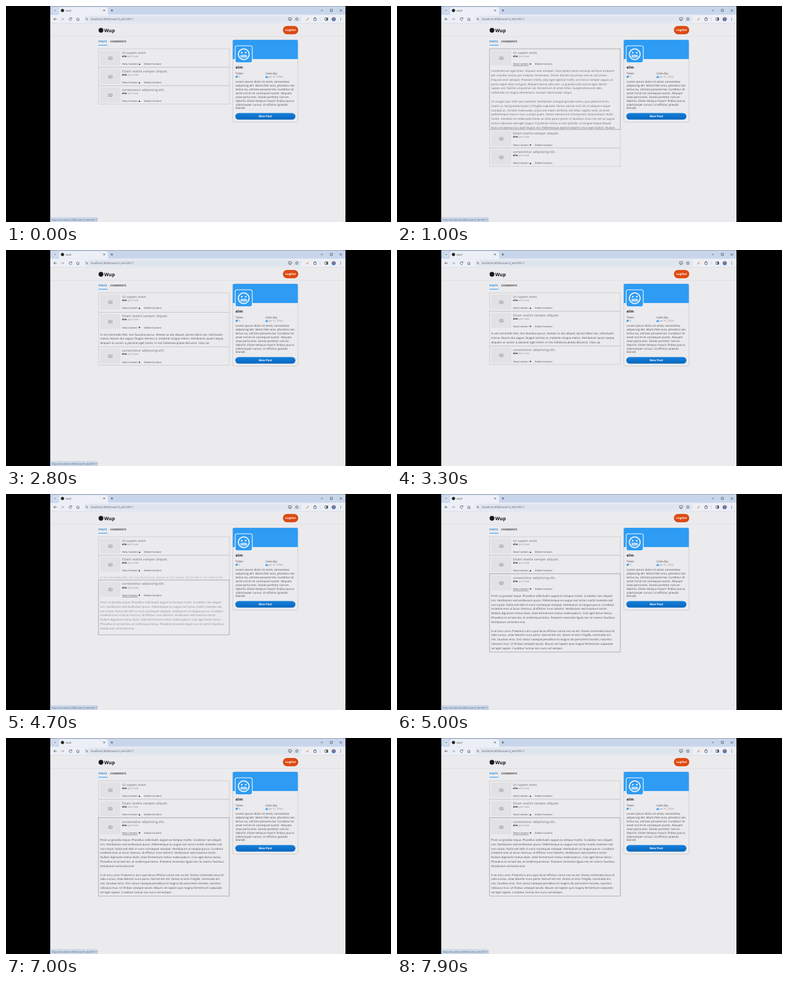
These frames come from a looping animation (600 by 338 pixels, 8 s). An HTML page with a canvas:

```html
<!DOCTYPE html>
<html lang="en">
<head>
<meta charset="utf-8">
<title>Wup</title>
<style>
html, body { margin: 0; width: 100%; height: 100%; overflow: hidden; background: #000; }
canvas { display: block; width: 600px; height: 338px; }
</style>
</head>
<body>
<canvas id="stage"></canvas>
<script>
const LOOP = 8000, SLIDE = 400, ROW = 6.82, HEAD = 28.9, BODY = 4.4;
const INK = '#4a4a4e', MUTED = '#8b8b90', PAGE = '#ebebee', LINE = '#c6c6ca', BLUE = '#2e9cf3';
const USER = 'elm', PATH = 'localhost:3000/user/3_elm/0517';

const canvas = document.getElementById('stage');
const dpr = window.devicePixelRatio || 1;
canvas.width = 600 * dpr;
canvas.height = 338 * dpr;
const c = canvas.getContext('2d');
c.textRendering = 'geometricPrecision';

const posts = [
  { title: 'Ut sapien enim', open: 800, close: 2460, over: [600, 1850], link: [700, 1700], rows: [
    'condimentum eget diam. Aliquam erat volutpat. Class aptent taciti sociosqu ad litora torquent',
    'per conubia nostra, per inceptos himenaeos. Donec blandit accumsan sem ac accumsan.',
    'Aliquam erat volutpat. Praesent mollis, odio eget egestas mollis, orci lectus semper augue, ac',
    'porta sapien diam id ligula. Aliquam lacinia velit sem, ut gravida nulla auctor eget. Morbi',
    'sapien orci, facilisis ut pulvinar vel, fermentum sit amet tellus. Suspendisse erat odio,',
    'sollicitudin at magna elementum, suscipit ullamcorper neque.',
    '',
    'Ut congue quis nibh quis molestie. Vestibulum volutpat gravida metus, quis placerat enim',
    'mattis ut. Sed gravida turpis in fringilla vulputate. Donec ultrices nisl nisl, et aliquam neque',
    'volutpat ac. Aenean malesuada, turpis sed mattis eleifend, nisl tellus sagittis ante, sit amet',
    'pellentesque mauris risus suscipit quam. Donec elementum tristique leo vitae pretium. Nulla',
    'facilisi. Interdum et malesuada fames ac ante ipsum primis in faucibus. Duis non nisl ac augue',
    'luctus vulputate sed eget augue. In pulvinar massa a nunc gravida, ut congue neque aliquet.',
    'Nunc vel egestas dui, eget feugiat nisi. Pellentesque egestas lobortis risus eget facilisis. Nullam',
    'tincidunt odio sed velit imperdiet posuere. Aenean ultricies, leo ac lacinia imperdiet, dui mi',
    'lacinia leo, eget hendrerit metus lectus non nunc. Phasellus ullamcorper nunc in luctus',
    'scelerisque.'] },
  { title: 'Etiam mattis semper aliquet.', open: 2460, close: 4560, over: [1900, 2800], link: [2150, 2750], rows: [
    'In vel commodo felis, non faucibus purus. Aenean ac dui aliquet, lacinia tellus nec, sollicitudin',
    'massa. Mauris dui augue, feugiat sed leo ut, molestie congue metus. Vestibulum quam neque,',
    'aliquam ac auctor a, placerat eget lorem. In hac habitasse platea dictumst. Class ap'] },
  { title: 'consectetur adipiscing elit.', open: 4560, close: LOOP * 2, over: [4050, LOOP], link: [4150, LOOP], rows: [
    'Proin ut gravida neque. Phasellus sollicitudin augue eu tempus mattis. Curabitur non aliquet',
    'nisi. Vestibulum sed vestibulum purus. Pellentesque eu augue nec tortor mattis molestie sed',
    'non turpis. Nulla sed nibh in nunc consequat volutpat. Vestibulum ut congue purus. Curabitur',
    'molestie eros ut lacus rhoncus, id efficitur risus lobortis. Vestibulum sed maximus tortor.',
    'Nullam dignissim metus diam, vitae fermentum metus malesuada in. Cras eget lectus lectus.',
    'Phasellus et ornare leo, at scelerisque lectus. Praesent venenatis ligula nec mi viverra faucibus.',
    'Vestibulum vel lorem erat.',
    '',
    'In et arcu urna. Praesent a arcu quis lacus efficitur varius nec eu est. Donec commodo lacus id',
    'odio cursus, vitae lobortis nunc porta. Sed vel elit nisi. Donec at eros fringilla, commodo est',
    'nec, faucibus eros. Orci varius natoque penatibus et magnis dis parturient montes, nascetur',
    'ridiculus mus. Ut finibus volutpat iaculis. Mauris vel sapien quis magna fermentum vulputate',
    'vel eget sapien. Curabitur lacinia non nunc vel semper.'] }
];

const bio = [
  'Lorem ipsum dolor sit amet, consectetur',
  'adipiscing elit. Morbi felis eros, pharetra non',
  'lectus eu, ultricies posuere leo. Curabitur sit',
  'amet nisl et mi consequat auctor. Aliquam',
  'vitae porta eros. Donec porttitor rutrum',
  'lobortis. Etiam tempus mauris finibus purus',
  'ullamcorper cursus. Ut efficitur gravida',
  'blandit.'];

const within = (t, [a, b]) => t >= a && t < b;

// cubic-bezier(.25, .1, .25, 1)
function ease(x) {
  if (x <= 0) return 0;
  if (x >= 1) return 1;
  const bez = (a, b, u) => 3 * a * u * (1 - u) ** 2 + 3 * b * u * u * (1 - u) + u ** 3;
  let lo = 0, hi = 1;
  for (let i = 0; i < 20; i++) {
    const mid = (lo + hi) / 2;
    if (bez(.25, .25, mid) < x) lo = mid; else hi = mid;
  }
  return bez(.1, 1, lo);
}

// Large glyphs scaled down keep exact fractional advances.
function text(str, x, y, size, color, weight = 400, align = 'left') {
  c.save();
  c.translate(x, y);
  c.scale(.1, .1);
  c.font = `${weight} ${size * 10}px "Open Sans", "Noto Sans", sans-serif`;
  c.textAlign = align;
  c.fillStyle = color;
  c.fillText(str, 0, 0);
  c.restore();
}

function rect(x, y, w, h, color) {
  c.fillStyle = color;
  c.fillRect(x, y, w, h);
}

function round(x, y, w, h, r, fill, stroke, lw = .7) {
  c.beginPath();
  c.roundRect(x, y, w, h, r);
  if (fill) { c.fillStyle = fill; c.fill(); }
  if (stroke) { c.strokeStyle = stroke; c.lineWidth = lw; c.stroke(); }
}

function dot(x, y, r, fill) {
  c.beginPath();
  c.arc(x, y, r, 0, 7);
  c.fillStyle = fill;
  c.fill();
}

function path(points, color, lw = .7) {
  c.beginPath();
  for (let i = 0; i < points.length; i += 2) c.lineTo(points[i], points[i + 1]);
  c.strokeStyle = color;
  c.lineWidth = lw;
  c.stroke();
}

function arc(x, y, r, a, b, color, lw = .7) {
  c.beginPath();
  c.arc(x, y, r, a, b);
  c.strokeStyle = color;
  c.lineWidth = lw;
  c.stroke();
}

function star(x, y, r) {
  c.beginPath();
  for (let i = 0; i < 10; i++) {
    const a = i * Math.PI / 5 - Math.PI / 2, d = i % 2 ? r * .45 : r;
    c.lineTo(x + d * Math.cos(a), y + d * Math.sin(a));
  }
  c.closePath();
  c.strokeStyle = '#444';
  c.lineWidth = .6;
  c.stroke();
}

function browser() {
  const ink = '#44474c';
  rect(69, .5, 460, 337.5, PAGE);
  rect(69, .5, 460, 13.5, '#c8d6ec');
  round(72.5, 3, 8, 8, 2, '#d3dff1');
  path([75, 6.2, 76.5, 7.7, 78, 6.2], ink);
  round(82.5, 2, 76.5, 13, [3, 3, 0, 0], '#eceff5');
  dot(88, 7, 2.5, '#222');
  text('WUP', 93, 8.5, 4, ink);
  path([151.6, 5.6, 154.2, 8.2], ink); path([154.2, 5.6, 151.6, 8.2], ink);
  path([163, 7, 167, 7], ink); path([165, 5, 165, 9], ink);
  path([490.5, 7, 494, 7], ink);
  round(505.4, 5.2, 3.4, 3.4, .3, null, ink);
  path([520, 5.2, 523.6, 8.8], ink); path([523.6, 5.2, 520, 8.8], ink);

  rect(69, 13.5, 460, 13.5, '#eceff5');
  rect(69, 26.8, 460, .6, '#d5d8de');
  path([79, 20.5, 74.6, 20.5], ink); path([76.6, 18.4, 74.5, 20.5, 76.6, 22.6], ink);
  path([85.5, 20.5, 90, 20.5], '#9a9da3'); path([88, 18.4, 90.1, 20.5, 88, 22.6], '#9a9da3');
  arc(100.5, 20.5, 2.1, .4, 5.6, ink);
  path([102.8, 18, 102.6, 19.8, 100.9, 19.6], ink);
  path([109.9, 20.4, 112, 18.3, 114.1, 20.4], ink); path([110.5, 20, 110.5, 22.7, 113.5, 22.7, 113.5, 20], ink);
  round(121, 15.4, 340, 10.2, 5.1, '#dfe5ef');
  dot(126, 20.5, 3.8, '#eceff5');
  path([124, 19.4, 128, 19.4], ink, .5); path([124, 21.6, 128, 21.6], ink, .5);
  dot(125, 19.4, .7, ink); dot(127, 21.6, .7, ink);
  text(PATH, 132, 22.1, 4.45, '#55585e');
  round(440.3, 18.4, 4.6, 3.2, .4, null, ink); path([441.3, 22.8, 444, 22.8], ink);
  star(453.3, 20.5, 2.6);
  path([468, 22.4, 471.6, 18.8], '#e08a3c', 1.1);
  round(479.7, 18.9, 3.8, 3.8, .5, null, ink); dot(481.6, 18.6, .9, ink);
  rect(489, 18, .6, 5, '#b9c3d5');
  round(497, 18.5, 4.4, 4, .4, null, ink); rect(499.3, 18.5, 2, 4, ink);
  dot(510.7, 20.6, 3.2, '#4a76c4'); dot(510.4, 19.5, 1.7, '#cf6a45');
  for (const y of [18.8, 20.5, 22.2]) dot(521.5, y, .55, ink);
}

function header() {
  dot(148, 38, 3.7, '#17171a');
  text('Wup', 153, 41, 7.4, '#17171a', 700);
  round(431.5, 31.2, 24, 13, 6.5, '#dc4a12');
  text('LogOut', 443.5, 39.3, 4.5, '#fff', 700, 'center');
  rect(69, 47, 460, .6, '#dcdce0');
  text('POSTS', 144, 57, 4.3, '#2b86d6', 700);
  rect(144, 60.8, 14, 1, BLUE);
  text('COMMENTS', 162.3, 57, 4.3, '#45454a', 700);
}

function face() {
  round(357.2, 62.2, 26.6, 26.6, 3, BLUE, '#eef4fb', 1.1);
  arc(370.5, 75.5, 8.4, 0, 7, '#f2f6fb', 1.7);
  dot(367.4, 73, 1.3, '#f2f6fb'); dot(373.6, 73, 1.3, '#f2f6fb');
  round(365.4, 76.4, 10.2, 4.2, 2, '#f2f6fb');
  for (const x of [367.8, 370.3, 372.8]) rect(x, 76.9, .5, 3.2, BLUE);
  rect(366.4, 78.3, 8.2, .4, BLUE);
}

function card() {
  round(353.4, 53, 101.6, 128.6, 2, PAGE, LINE);
  round(353.4, 53, 101.4, 30, [2, 2, 0, 0], BLUE);
  face();
  text(USER, 357.8, 98.2, 6, '#222226', 700);
  text('Token', 357.8, 106.5, 4.4, INK);
  text('Cake day', 404.3, 106.5, 4.4, INK);
  round(357.8, 109.8, 2.4, 2.8, .8, BLUE); round(359.2, 108.9, 2.2, 2.6, .8, BLUE);
  text('0', 362.8, 112.3, 3.9, MUTED);
  round(404.4, 110.2, 3.6, 2.4, .5, BLUE); rect(405.9, 108.7, .6, 1.5, BLUE);
  text('Jan 31, 2024', 408.8, 112.3, 4, MUTED);
  bio.forEach((s, i) => text(s, 357.8, 120.2 + i * 5.89, 4.46, INK));
  const g = c.createLinearGradient(0, 167, 0, 178);
  g.addColorStop(0, '#1681dc');
  g.addColorStop(1, '#0867be');
  round(357.3, 167.4, 93.8, 10.4, 5.2, g);
  text('New Post', 404.2, 174.2, 4.5, '#fff', 700, 'center');
}

function thumb(y) {
  round(146.6, y + 2.7, 31.4, 23.4, 1, '#e2e2e5');
  round(159.8, y + 12.7, 5.6, 4, .6, null, '#99999e', .8);
  rect(161, y + 13.8, 1.6, 1.4, '#99999e');
  rect(163.2, y + 14, 1.4, .5, '#99999e'); rect(161, y + 15.6, 3.6, .5, '#99999e');
}

function arrow(x, y, turn) {
  c.save();
  c.translate(x, y);
  c.rotate(turn * Math.PI);
  c.beginPath();
  c.moveTo(0, -1.2); c.lineTo(1.6, 1.1); c.lineTo(-1.6, 1.1);
  c.fillStyle = '#333';
  c.fill();
  c.restore();
}

function list(t) {
  let y = 67, hot;
  for (const p of posts) {
    const k = ease((t - p.open) / SLIDE) - ease((t - p.close) / SLIDE);
    const h = HEAD + k * (p.rows.length * ROW + 4.9);
    c.strokeStyle = LINE;
    c.lineWidth = .7;
    c.strokeRect(144.2, y, 203.8, h);
    if (within(t, p.over)) hot = [144.2, y, 203.8, h];
    thumb(y);
    text(p.title, 180.8, y + 7.7, 5.15, MUTED, 600);
    text(USER, 180.8, y + 12.8, 4.1, '#2c2c30', 700);
    text('just now', 190, y + 12.8, 4.1, MUTED);
    text('View Content', 180.8, y + 25.4, 3.9, INK);
    if (within(t, p.link)) rect(180.8, y + 26.2, 24.4, .5, INK);
    arrow(208, y + 24, k);
    text('Delete Content', 214.8, y + 25.4, 3.9, INK);
    if (k > 0) {
      c.save();
      c.beginPath();
      c.rect(144, y + HEAD, 204, h - HEAD);
      c.clip();
      c.globalAlpha = k;
      p.rows.forEach((s, i) => text(s, 146.8, y + HEAD + 7.3 + i * ROW, BODY, INK));
      c.restore();
    }
    y += h;
  }
  if (hot) {
    c.strokeStyle = '#b0b0b4';
    c.strokeRect(...hot);
  }
}

function status() {
  round(69, 331, 73.6, 7, [0, 2, 0, 0], '#cbd8ec', '#b9c4d6', .5);
  text('https://' + PATH, 71.2, 335.9, 3.85, '#555b66');
}

function draw(t) {
  c.setTransform(dpr, 0, 0, dpr, 0, 0);
  rect(0, 0, 600, 338, '#000');
  browser();
  header();
  list(t);
  card();
  rect(0, 0, 69, 338, '#000');
  const idle = within(t, [300, 700]) || within(t, [2950, 4150]);
  if (!idle) status();
}

const start = performance.now();
function tick() {
  draw((performance.now() - start) % LOOP);
  requestAnimationFrame(tick);
}
tick();
</script>
</body>
</html>
```
